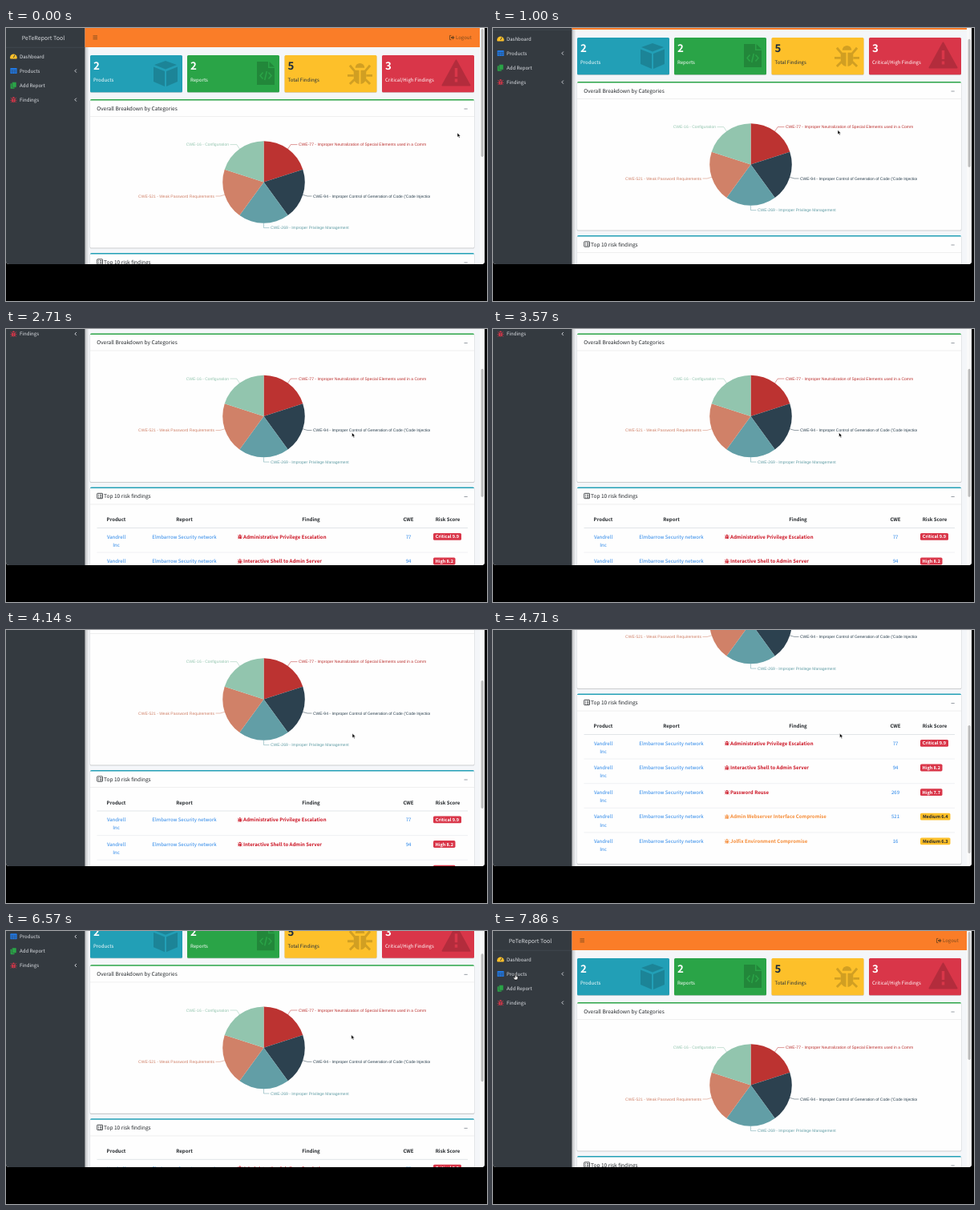
Recreate the animation shown at these times as an HTML page. Size 600x341 px, loop 8000 ms.

```html
<!DOCTYPE html>
<html lang="en">
<head>
<meta charset="utf-8">
<title>Report dashboard</title>
<style>
html, body { margin: 0; width: 100%; height: 100%; overflow: hidden; background: #000; }
svg { display: block; width: 600px; height: 341px; }
text {
  font-family: "Noto Sans CJK JP", "Noto Sans CJK SC", "Noto Sans CJK", "Open Sans", sans-serif;
  text-rendering: geometricPrecision;
  white-space: pre;
}
.chart text { font-family: "Liberation Sans", Arial, sans-serif; }
</style>
</head>
<body>
<svg viewBox="0 0 600 341">
  <defs>
    <clipPath id="window"><path d="M0 0H597V291a4 4 0 0 1-4 4H4a4 4 0 0 1-4-4Z"/></clipPath>
    <clipPath id="chartArea"><rect x="113" y="112" width="416" height="162"/></clipPath>
    <linearGradient id="edge">
      <stop stop-color="#000" stop-opacity=".22"/>
      <stop offset="1" stop-color="#000" stop-opacity="0"/>
    </linearGradient>
    <symbol id="bug" viewBox="0 0 32 32">
      <path fill="currentColor" d="M10 9a6 6 0 0 1 12 0ZM15 12V30C10 29 8 26 8 21V12ZM17 12V30c5-1 7-4 7-9V12Z"/>
      <path fill="none" stroke="currentColor" stroke-width="3" d="M0 19H8M24 19h8M3 6l6 7M29 6l-6 7M3 30l6-6M29 30l-6-6"/>
    </symbol>
  </defs>
  <g clip-path="url(#window)">
    <rect width="597" height="295" fill="#f4f6f9"/>
    <rect width="98.500" height="295" fill="#343a40"/>
    <rect x="98.500" width="5" height="295" fill="url(#edge)"/>
    <g id="page"></g>
    <rect x="591" width="6" height="295" fill="#fafafa"/>
    <rect id="thumb" x="592.500" y="1" width="3.400" height="160" rx="1.700" fill="#bfbfbf"/>
  </g>
  <path id="arrow" d="M0 0V5.300L1.300 4.200 2.200 6.200 3.200 5.800 2.300 3.900H4Z" fill="#000" stroke="#fff" stroke-width=".5"/>
  <path id="hand" d="M-.7 0Q0-.8.7 0V2.300L3 3V5.200L2 7H-1L-2.800 4.200-2 3.500-.7 4.500Z" fill="#fff" stroke="#000" stroke-width=".6"/>
</svg>
<script>
const TEAL = '#229fb6', GREEN = '#2aa447', YELLOW = '#fdc02a', RED = '#d93649';
const INK = '#212529', LINK = '#2483e8', ORANGE = '#f58a34', CRIMSON = '#cb1020';

const $ = id => document.getElementById(id);
const rect = (x, y, w, h, fill, extra = '') =>
  `<rect x="${x}" y="${y}" width="${w}" height="${h}" fill="${fill}" ${extra}/>`;
const fillPath = (d, fill, extra = '') => `<path d="${d}" fill="${fill}" ${extra}/>`;
const line = (d, color, width = 1) =>
  `<path d="${d}" fill="none" stroke="${color}" stroke-width="${width}"/>`;
// y is the middle of the capitals
const text = (x, y, str, { fill = INK, size = 6.05, anchor = 'start', bold = false } = {}) =>
  `<text x="${x}" y="${y + size * .365}" fill="${fill}" font-size="${size}" text-anchor="${anchor}"
    font-weight="${bold ? 700 : 400}">${str}</text>`;
const bug = (x, y, size, color) =>
  `<use href="#bug" x="${x}" y="${y}" width="${size}" height="${size}" color="${color}"/>`;

function sidebar() {
  const fill = '#e0e3e8';
  const names = ['Dashboard', 'Products', 'Add Report', 'Findings'];
  const gauge = fillPath('M5.500 38.500A4.300 4.300 0 1 1 13.300 38.500Z', YELLOW) + line('M9.400 37L11 33.500', '#343a40', .9);
  const table = rect(5.3, 50, 8.4, 7, '#2079e6', 'rx=".8"') + line('M5.300 52.500H13.700M5.300 54.700H13.700M8 52V57M11 52V57', '#343a40', .4);
  const copy = rect(5.6, 69.3, 5, 6.5, GREEN, 'rx=".6"') + rect(7.6, 67.6, 5.4, 6.6, GREEN, 'rx=".6" stroke="#343a40" stroke-width=".5"');
  return text(46.5, 12, 'PeTeReport Tool', { fill: '#d5d8db', size: 7, anchor: 'middle' })
    + line('M0 24.300H98.500', '#4b545c', .5)
    + gauge + table + copy + bug(5.2, 85.3, 8.4, RED)
    + names.map((name, i) => text(17, 35.6 + 18 * i, name, { fill })).join('')
    + [53.6, 89.6].map(y => line(`M87.800 ${y - 2}L85.900 ${y}L87.800 ${y + 2}`, fill, .9)).join('');
}

function topBar() {
  const dark = '#7c4a1e';
  return rect(98.5, 0, 492.5, 24, '#fa7d28')
    + line('M108.500 9.800H114M108.500 11.800H114M108.500 13.800H114', dark, .8)
    + line('M555.500 9.400H553.500V14.600H555.500', dark, .9)
    + fillPath('M555 11H557V9.200L559.600 12 557 14.800V13H555Z', dark)
    + text(561, 12, 'Logout', { fill: dark });
}

function counters() {
  const cube = fillPath('M199 41L213 46 199 51.500 185 46ZM184 48.500L198 54V73L184 67ZM214 48.500L200 54V73L214 67Z', '#000');
  const file = fillPath('M313 42H327V50H335V71H313ZM328.500 42L335 48.500H328.500Z', '#000')
    + line('M320.500 55.500L317 59.500 320.500 63.500M327.500 55.500L331 59.500 327.500 63.500M325.300 54L322.700 65', GREEN, 1.5);
  const warning = fillPath('M561.500 40.500L578.500 71.500H544.500Z', '#000', 'stroke="#000" stroke-width="2" stroke-linejoin="round"')
    + line('M561.500 50V61M561.500 63.500V67.500', RED, 3.4);
  const boxes = [
    [105, TEAL, '2', 'Products', cube],
    [226, GREEN, '2', 'Reports', file],
    [347.5, YELLOW, '5', 'Total Findings', bug(426, 41, 31, '#000')],
    [469, RED, '3', 'Critical/High Findings', warning],
  ];
  return boxes.map(([x, color, count, label, icon]) => {
    const fill = color === YELLOW ? '#1f2d3d' : '#fff';
    return rect(x, 34.6, 115, 46.5, '#000', 'rx="1.500" opacity=".16"')
      + rect(x, 34, 115, 46.3, color, 'rx="1.500"')
      + `<g opacity=".17">${icon}</g>`
      + text(x + 4, 47.3, count, { fill, size: 13.3, bold: true })
      + text(x + 4, 65, label, { fill });
  }).join('');
}

function card(y, height, color, title, titleX) {
  return rect(104.6, y + .5, 479.8, height + .6, '#000', 'rx="1.600" opacity=".17"')
    + rect(105, y, 479, height, '#fefefe', 'rx="1.500"')
    + fillPath(`M105 ${y + 1.5}Q105 ${y} 106.500 ${y}H582.500Q584 ${y} 584 ${y + 1.5}Z`, color)
    + line(`M105 ${y + 21.5}H584`, '#dfdfdf', .5)
    + text(titleX, y + 11.3, title, { size: 6.55 })
    + line(`M571.500 ${y + 12}H575.700`, '#8d949b', .9);
}

function pieChart() {
  const cx = 321.5, cy = 192.5, radius = 51.3;
  const point = (turn, r) => {
    const a = turn * 2 * Math.PI;
    return [cx + r * Math.sin(a), cy - r * Math.cos(a)].map(v => v.toFixed(2));
  };
  const slices = [
    ['#bc3331', 'CWE-77 - Improper Neutralization of Special Elements used in a Comm', 365, 145.6],
    ['#2c414f', "CWE-94 - Improper Control of Generation of Code ('Code Injection')", 383, 210],
    ['#629ea6', 'CWE-269 - Improper Privilege Management', 330, 249.6],
    ['#d08168', 'CWE-521 - Weak Password Requirements', 260, 210],
    ['#92c5ae', 'CWE-16 - Configuration', 278, 145.6],
  ];
  return '<g class="chart" clip-path="url(#chartArea)">' + slices.map(([color, label, x, y], i) => {
    const left = i > 2;
    const mid = (i + .5) / 5;
    return fillPath(`M${cx} ${cy}L${point(i / 5, radius)}A${radius} ${radius} 0 0 1 ${point((i + 1) / 5, radius)}Z`, color)
      + line(`M${point(mid, radius)}L${point(mid, 57.3)[0]} ${y}H${x + (left ? 1.5 : -1.5)}`, color, .5)
      + text(x, y, label, { fill: color, size: 5.03, anchor: left ? 'end' : 'start' });
  }).join('') + '</g>';
}

function findings() {
  const columns = [137.5, 222.5, 380.5, 502, 551];
  const heads = ['Product', 'Report', 'Finding', 'CWE', 'Risk Score'];
  const rows = [
    ['Administrative Privilege Escalation', 77, 'Critical 9.9', 35],
    ['Interactive Shell to Admin Server', 94, 'High 8.2', 27.5],
    ['Password Reuse', 269, 'High 7.7', 27.5],
    ['Admin Webserver Interface Compromise', 521, 'Medium 6.4', 37.5],
    ['Jolfix Environment Compromise', 16, 'Medium 6.3', 37.5],
  ];
  const link = { fill: LINK, anchor: 'middle' };
  return rect(113.7, 288.8, 6.8, 6.4, 'none', 'rx=".6" stroke="#212529" stroke-width=".8"')
    + line('M115 290.600H116M117 290.600H119.500M115 292.200H116M117 292.200H119.500M115 293.800H116M117 293.800H119.500', INK, .7)
    + heads.map((head, i) => text(columns[i], 321.6, head, { anchor: 'middle', bold: true })).join('')
    + line('M113.500 332H576', '#dee2e6', .9)
    + rows.map(([name, cwe, score, width], i) => {
      const y = 343 + 30.6 * i;
      const medium = score.startsWith('Medium');
      const color = medium ? ORANGE : CRIMSON;
      return (i ? line(`M113.500 ${y - 11}H576`, '#dee2e6', .5) : '')
        + text(columns[0], y, 'Vandrell', link) + text(columns[0], y + 10.2, 'Inc', link)
        + text(columns[1], y, 'Elmbarrow Security network', link)
        + bug(288.5, y - 3.4, 6.6, color)
        + text(296, y, name, { fill: color, bold: true })
        + text(columns[3], y, cwe, link)
        + rect(533, y - 4.5, width, 8.8, medium ? YELLOW : RED, 'rx="1.600"')
        + text(533 + width / 2, y - .1, score, { fill: medium ? INK : '#fff', size: 5.55, bold: true, anchor: 'middle' });
    }).join('');
}

$('page').innerHTML = sidebar() + topBar() + counters()
  + card(89, 185.5, GREEN, 'Overall Breakdown by Categories', 113.3) + pieChart()
  + card(281, 212.5, TEAL, 'Top 10 risk findings', 122) + findings()
  + rect(98.5, 500.5, 492.5, 12, '#fdfdfd') + line('M98.500 500.500H591', '#dee2e6', .5);

const LOOP = 8000, STEPS = 56;
const scrollKeys = [[0, 0], [710, 0], [1000, 22], [1140, 42], [1430, 70], [1714, 80.5], [2000, 83.5], [3857, 83.5],
  [4143, 106], [4429, 165], [4714, 201.5], [5000, 213], [5286, 215], [5857, 215], [6143, 186],
  [6429, 85], [6571, 46.7], [6714, 22], [6857, 8], [7143, 0], [8000, 0]];
const cursorKeys = [[0, 563, 131], [143, 563, 131], [430, 505, 130], [860, 430, 127.5], [1714, 430, 127.5],
  [2600, 431.5, 129.5], [3571, 431.5, 129.5], [4714, 432.5, 129.2], [5714, 434.5, 129.7], [6571, 430.8, 129.7],
  [7000, 425, 128], [7286, 250, 95], [7571, 60, 60], [7857, 28, 54], [8000, 28, 54]];

function sample(keys, t) {
  const i = Math.max(1, keys.findIndex(key => key[0] >= t));
  const a = keys[i - 1], b = keys[i];
  const p = (t - a[0]) / (b[0] - a[0]);
  return a.slice(1).map((v, n) => v + (b[n + 1] - v) * p);
}

function draw(elapsed) {
  const step = Math.floor((elapsed % LOOP + 6) * STEPS / LOOP) % STEPS;
  const t = step * LOOP / STEPS;
  const [scroll] = sample(scrollKeys, t);
  const [x, y] = sample(cursorKeys, t);
  const overLink = x < 98;
  $('page').setAttribute('transform', `translate(0 ${-scroll})`);
  $('thumb').setAttribute('transform', `translate(0 ${scroll * .585})`);
  for (const id of ['arrow', 'hand']) $(id).setAttribute('transform', `translate(${x} ${y})`);
  $('arrow').setAttribute('visibility', overLink ? 'hidden' : 'visible');
  $('hand').setAttribute('visibility', overLink ? 'visible' : 'hidden');
}

const start = performance.now();
function tick() {
  draw(performance.now() - start);
  requestAnimationFrame(tick);
}
tick();
</script>
</body>
</html>
```
